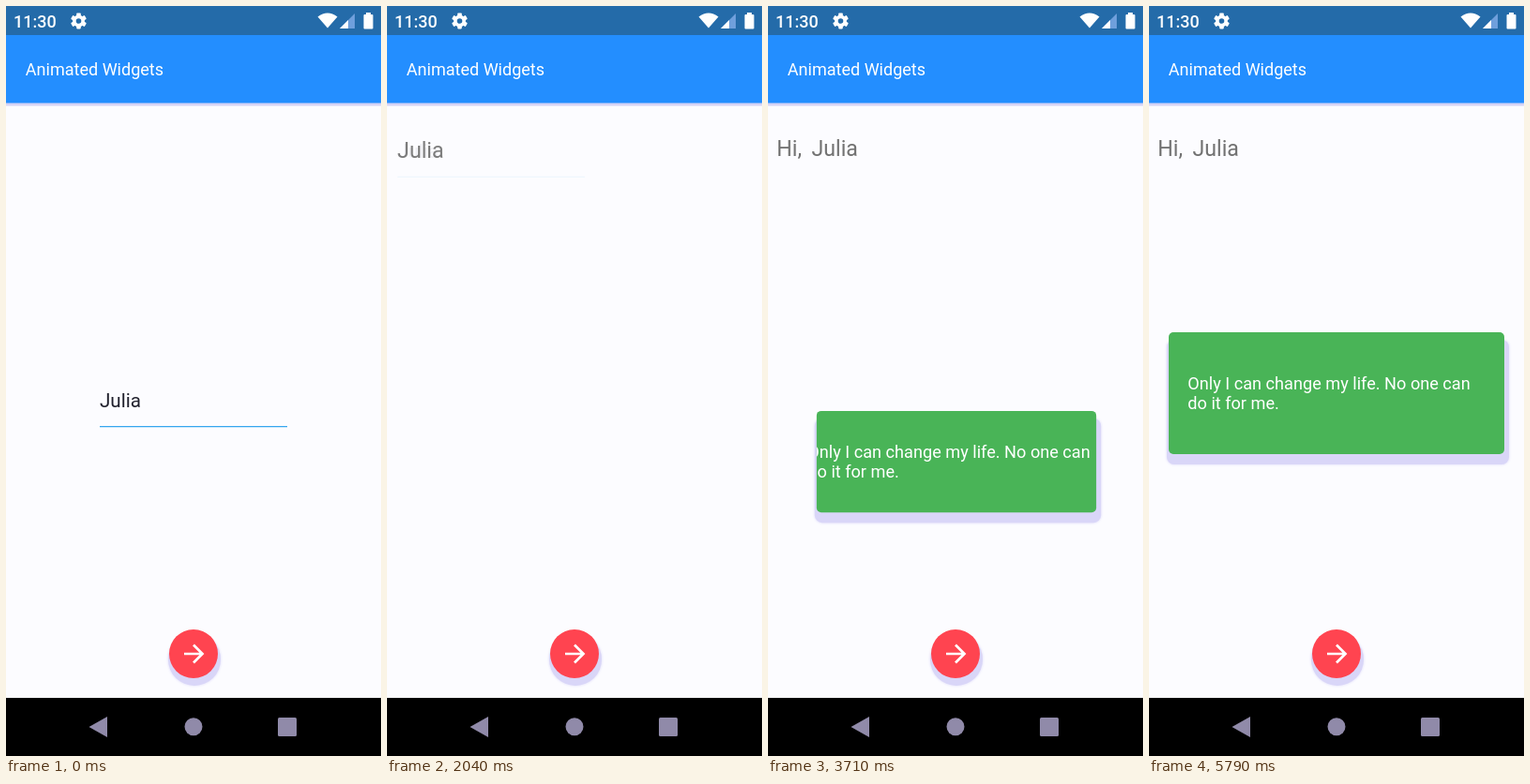
An HTML page with a canvas for the animation above (6 s loop, 400x800 px).

```html
<!DOCTYPE html>
<html lang="en">
<head>
<meta charset="utf-8">
<title>Animated Widgets</title>
<style>
  html, body { margin: 0; width: 100%; height: 100%; overflow: hidden; background: #fcfcff; }
  canvas { display: block; width: 400px; height: 800px; }
</style>
</head>
<body>
<canvas id="stage" width="400" height="800"></canvas>
<script>
const ctx = document.getElementById('stage').getContext('2d');
const LOOP = 6000, DURATION = 1000;
const NAME_START = 1102, GREETING_START = 2080, CARD_START = 3057;
const NAME = 'Julia';
const SHADOW = '#d9d6f8', NAV = '#908aa9';

const progress = (time, start) => Math.min(1, Math.max(0, (time - start) / DURATION));
const mix = (a, b, p) => a + (b - a) * p;
const easeOutCubic = t => 1 - (1 - t) ** 3;

// cubic-bezier(0, 0, .58, 1), solved by bisection
function easeOut(t) {
  let low = 0, high = 1;
  for (let i = 0; i < 24; i++) {
    const s = (low + high) / 2;
    if (1.74 * s * s - 0.74 * s ** 3 < t) low = s; else high = s;
  }
  return 3 * low * low - 2 * low ** 3;
}

function text(value, x, y, size, color, weight = 400) {
  ctx.font = `${weight} ${size}px Roboto, sans-serif`;
  ctx.fillStyle = color;
  ctx.fillText(value, x, y);
}

function rect(x, y, w, h, color, radius = 0) {
  ctx.fillStyle = color;
  ctx.beginPath();
  ctx.roundRect(x, y, w, h, radius);
  ctx.fill();
}

function circle(x, y, r, color) {
  ctx.fillStyle = color;
  ctx.beginPath();
  ctx.arc(x, y, r, 0, Math.PI * 2);
  ctx.fill();
}

function shape(path, color) {
  ctx.fillStyle = color;
  ctx.fill(new Path2D(path));
}

function clipped(x, y, w, h, draw) {
  ctx.save();
  ctx.beginPath();
  ctx.rect(x, y, w, h);
  ctx.clip();
  draw();
  ctx.restore();
}

function softShadow(draw) {
  ctx.save();
  ctx.shadowColor = SHADOW;
  ctx.shadowBlur = 3;
  draw();
  ctx.restore();
}

function drawName(time) {
  const fade = progress(time, NAME_START);
  const move = easeOut(fade);
  const greeting = 36 * easeOutCubic(progress(time, GREETING_START));
  const x = mix(100, 10.5, move);
  const y = mix(428, 160, move);

  ctx.globalAlpha = 1 - fade;
  text(NAME, x, y, 20.6, '#20202c');
  rect(x, y + 20, 200, 1.2, '#36a6ee');
  ctx.globalAlpha = fade;
  text(NAME, x + greeting, y, 23.2, '#727272');
  ctx.globalAlpha = 1;

  if (greeting > 0) {
    clipped(9, 130, greeting, 45, () => text('Hi,', 9.3, 160, 23.2, '#727272'));
  }
}

function drawCard(time) {
  const p = easeOut(progress(time, CARD_START));
  if (p === 0) return;
  const w = 358 * p, h = 130 * p;
  const cx = mix(206, 200, p), cy = mix(851, 413, p);
  const x = cx - w / 2, y = cy - h / 2;

  softShadow(() => rect(x - 2, y + 8, w + 7, h + 3, SHADOW, 8));
  rect(x, y, w, h, '#49b457', 5);
  clipped(x, y, w, h, () => {
    text('Only I can change my life. No one can', cx - 158.7, cy - 4, 18.15, '#fff');
    text('do it for me.', cx - 158.7, cy + 17, 18.15, '#fff');
  });
}

function drawButton() {
  softShadow(() => circle(201, 697, 28, SHADOW));
  circle(200, 691, 26, '#ff4450');
  ctx.strokeStyle = '#fff';
  ctx.lineWidth = 2.7;
  ctx.stroke(new Path2D('M190 691H209M200 681.5L209.5 691L200 700.5'));
}

function drawGear(x, y) {
  ctx.save();
  ctx.translate(x, y);
  for (let i = 0; i < 6; i++) {
    rect(-2.3, -8.4, 4.6, 5, '#fff', 0.8);
    ctx.rotate(Math.PI / 3);
  }
  circle(0, 0, 6.4, '#fff');
  circle(0, 0, 2.8, '#246ba9');
  ctx.restore();
}

function drawBars() {
  rect(0, 103, 400, 3.5, '#d6d4f6');
  rect(0, 31, 400, 72.5, '#238eff');
  text('Animated Widgets', 20.8, 74, 18.05, '#fff');

  rect(0, 0, 400, 31, '#246ba9');
  text('11:30', 8, 22.5, 18, '#fff', 500);
  drawGear(77.5, 16);
  shape('M332.5 11.5Q343 3.5 353.5 11.5L343 23.5Z', '#fff');
  shape('M356 24L372 8V24Z', '#6f9fdc');
  shape('M356 24L365 15V24Z', '#fff');
  rect(381.5, 9, 10, 15.5, '#fff', 1);
  rect(384, 7, 5, 3, '#fff');

  rect(0, 738, 400, 62, '#000');
  shape('M88.5 769L108 758V780Z', NAV);
  circle(200, 768.8, 9.5, NAV);
  rect(290, 759, 20, 20, NAV, 1.5);
}

function frame(now) {
  const time = now % LOOP;
  rect(0, 0, 400, 800, '#fcfcff');
  drawName(time);
  drawCard(time);
  drawButton();
  drawBars();
  requestAnimationFrame(() => frame(performance.now()));
}
frame(0);
</script>
</body>
</html>
```
